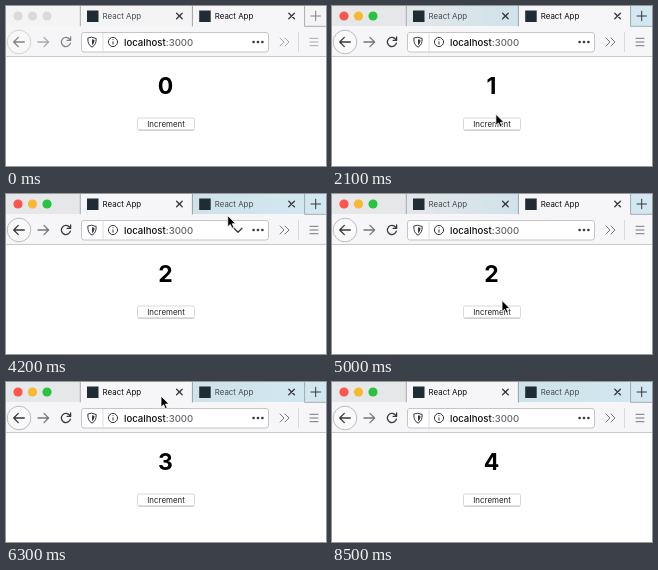
Animation, 320 px wide and 160 px high, one loop 9100 ms. Source, as an HTML page:

```html
<!DOCTYPE html>
<html lang="en">
<head>
<meta charset="utf-8">
<title>Counter in two tabs</title>
<style>
  html, body { margin: 0; width: 100%; height: 100%; overflow: hidden; background: #fff; }
  svg { display: block; width: 320px; height: 160px; font-family: Inter, "Open Sans", sans-serif; }
  .line { fill: none; stroke: #38383d; stroke-width: 1.3; stroke-linecap: round; stroke-linejoin: round; }
  .thin { stroke-width: 1; }
  .soft { stroke: #77777b; }
  .rule { fill: none; stroke: #d4d4d7; stroke-width: .8; }
  .edge { fill: none; stroke: #9da4a8; stroke-width: .9; }
  .tab .face { fill: none; }
  .tab text { font-size: 7.9px; fill: #454c50; }
  .tab.on .face { fill: #f6f6f8; }
  .tab.on text { fill: #0c0c0d; }
  .idle .strip { fill: #f4f4f5; }
  .idle .lights circle { fill: #dadada; }
  .idle .icons { opacity: .6; }
</style>
</head>
<body>
<svg id="stage" viewBox="0 0 320 160">
  <defs>
    <linearGradient id="bar">
      <stop offset=".2" stop-color="#e6e7e9"/>
      <stop offset=".6" stop-color="#cfe2ea"/>
      <stop offset="1" stop-color="#d3e8f1"/>
    </linearGradient>
  </defs>

  <rect width="320" height="160" fill="#fff"/>
  <rect class="strip" width="320" height="20.5" fill="url(#bar)"/>
  <rect y="20" width="320" height="30.5" fill="#f6f6f8"/>
  <path d="M0 50.5H320" stroke="#c9c9cc"/>

  <g class="lights">
    <circle cx="12" cy="10" r="4.6" fill="#fb5650"/>
    <circle cx="26.5" cy="10" r="4.6" fill="#f8b832"/>
    <circle cx="41" cy="10" r="4.6" fill="#2ac33f"/>
  </g>

  <g id="tabs"></g>
  <path class="edge" d="M298.6 20.3H320"/>

  <g class="icons">
    <path class="line thin" d="M305 10h9.5M309.7 5.2v9.5"/>
    <circle cx="13" cy="36" r="11.8" fill="#fafafb" stroke="#b5b5b8" stroke-width=".9"/>
    <path class="line" d="M18.3 36H8M12.3 31.4L7.7 36l4.6 4.6"/>
    <path class="line soft" d="M32 36h10.3M38 31.4l4.6 4.6l-4.6 4.6"/>
    <path class="line" d="M63.6 33.2A4.6 4.6 0 1 0 64.4 37.2M64.6 31v3.4h-3.4"/>
    <path class="line soft thin" d="M274 32l4 4l-4 4M279 32l4 4l-4 4"/>
    <path class="line soft thin" d="M304 32.3h8M304 36h8M304 39.7h8"/>
  </g>
  <path class="rule" d="M292.5 26V46"/>

  <rect x="75.5" y="26.5" width="187" height="19.5" rx="2.5" fill="#fff" stroke="#c5c5c8"/>
  <path class="line thin" d="M86 31.3l4.2 1.2c0 4.5-1 6.7-4.2 8.7c-3.2-2-4.2-4.2-4.2-8.7z"/>
  <path d="M86 33.3v6c1.7-1.3 2.4-2.8 2.5-5.3z" fill="#38383d"/>
  <path class="rule" d="M97 27V45.5"/>
  <circle class="line thin" cx="107" cy="36" r="4.6"/>
  <path class="line thin" d="M107 35.8v2.4M107 33.6v.1"/>
  <path class="line" d="M247.6 36h0M252 36h0M256.4 36h0" style="stroke-width:2.7"/>
  <path id="chevron" class="line" d="M228 34.2l4 4l4-4"/>
  <text x="118" y="39.8" font-size="9.6" font-weight="500" fill="#0c0c0d">localhost<tspan fill="#66666b">:3000</tspan></text>

  <text id="count" x="159.5" y="88.3" font-size="23" font-weight="700" text-anchor="middle">0</text>
  <rect x="131.5" y="112" width="57" height="12" rx="1.5" fill="#fff" stroke="#d0d0d0" stroke-width=".8"/>
  <path d="M132.5 124.2h55" stroke="#b4b4b4" stroke-width=".7"/>
  <text x="160" y="120.8" font-size="7.9" fill="#222" text-anchor="middle">Increment</text>

  <path id="cursor" d="M0 0V11.2L2.6 8.8L4.3 12.7L6.2 11.9L4.5 8.1H8Z" stroke="#fff" stroke-width=".8"/>
</svg>
<script>
const LOOP = 9100, TICK = 100, FOCUS_AT = 900, ENTER_AT = 600, LEAVE_AT = 8500;

const outside = [314, 141], button = [166, 113], buttonEdge = [165, 120];
const firstTab = [155, 14], secondTab = [230, 8], toolbar = [174, 23], away = [232, 46];

// pointer moves: start ms, end ms, destination
const moves = [
  [600, 1200, buttonEdge], [2085, 2600, firstTab], [2900, 3500, button],
  [4000, 4500, secondTab], [4700, 5300, button], [5500, 5900, toolbar],
  [6100, 6300, firstTab], [6500, 7000, buttonEdge], [8200, 8500, away]
];
const increments = [1900, 3800, 5600, 7300];
const tabSwitches = [2500, 4400, 6200];

const $ = id => document.getElementById(id);
const passed = (times, t) => times.filter(time => time <= t).length;
const easeOut = k => 1 - (1 - k) ** 4;

function pointerAt(t) {
  return moves.reduce((from, [start, end, to]) => {
    const k = easeOut(Math.min(1, Math.max(0, (t - start) / (end - start))));
    return from.map((v, i) => v + (to[i] - v) * k);
  }, outside);
}

$("tabs").innerHTML = [74, 186.2].map(x => `
  <g class="tab" transform="translate(${x} 0)">
    <rect class="face" width="112.4" height="20.5"/>
    <path class="edge" d="M.3 0V20.3M112.4 0V20.3"/>
    <rect x="7" y="4.5" width="11.5" height="11.5" fill="#202c33"/>
    <text x="22.6" y="13.1">React App</text>
    <path class="line" d="M96.6 7.2l5.6 5.6M102.2 7.2l-5.6 5.6"/>
  </g>`).join("");
const tabs = document.querySelectorAll(".tab");

function draw(t) {
  const [x, y] = pointerAt(t);
  const visible = t >= ENTER_AT && t < LEAVE_AT;
  const activeTab = (passed(tabSwitches, t) + 1) % 2;
  $("stage").classList.toggle("idle", t < FOCUS_AT);
  tabs.forEach((tab, i) => tab.classList.toggle("on", i === activeTab));
  $("count").textContent = passed(increments, t);
  $("cursor").style.display = visible ? "" : "none";
  $("cursor").setAttribute("transform", `translate(${x} ${y})`);
  // the address bar shows its chevron while the toolbar is hovered
  $("chevron").style.display = visible && y > 20.5 && y < 50 ? "" : "none";
}

const start = performance.now();
function frame() {
  const t = (performance.now() - start) % LOOP;
  draw(Math.floor(t / TICK) * TICK);
  requestAnimationFrame(frame);
}
frame();
</script>
</body>
</html>
```
